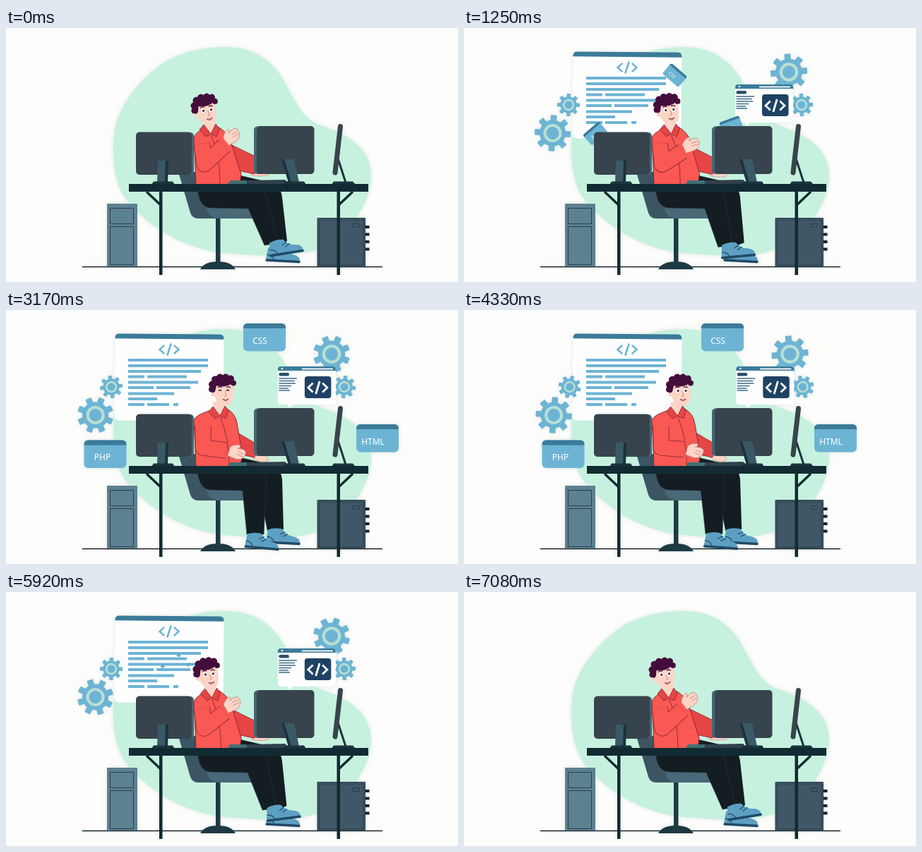
Animation of 640x360 px, one loop 7.16 s. Source, as an HTML page:

```html
<!DOCTYPE html>
<html lang="en">
<head>
<meta charset="utf-8">
<title>Developer at a desk</title>
<style>
  html, body { margin: 0; width: 100%; height: 100%; overflow: hidden; background: #fdfdfc; }
  svg { display: block; width: 100vw; height: 100vh; }
  #scene { filter: drop-shadow(0 0 3px rgba(185, 200, 195, .4)); }
  text { font-family: "Noto Sans", "Open Sans", sans-serif; fill: #fff; text-anchor: middle; }
  .code { fill: none; stroke-linejoin: miter; }
</style>
</head>
<body>
<svg viewBox="0 0 640 360">
  <g id="scene">
    <path fill="#c6f1de" d="M310 27C350 27 376 45 392 72C408 100 416 124 440 136C472 147 517 163 517 210C517 245 488 294 440 314C405 327 350 323 300 318C240 308 195 275 168 240C152 215 150 180 153 150C158 110 190 70 230 45C255 32 285 27 310 27Z"/>
    <g id="back"></g>
    <g id="tags"></g>
    <path stroke="#17242a" stroke-width="1.5" d="M108 338.5H533"/>

    <g stroke="#2a3e4e">
      <path fill="#5c8190" stroke="none" d="M143 249H186V338H143Z"/>
      <path fill="none" d="M147.5 255.5H180.5V277.5H147.500ZM147.5 281.5H180.5V335.5H147.500Z"/>
      <path fill="#3f5766" d="M441 269.5H508.5V338H441Z"/>
      <path fill="none" d="M443.5 272H506V336H443.500ZM491.5 277.5H500.5V282.5H491.500Z"/>
      <path stroke="#13232a" stroke-width="4" d="M509 282H514.5M509 292.500H514.5M509 303H514.5M509 313.500H514.5"/>
    </g>

    <g id="chair">
      <path fill="#3b5563" d="M244 204H270L282 252L350 253Q354 262 350 270H272Q264 270 261 262Z"/>
      <path fill="#496878" d="M284 255H350Q355 262 350 270H300Q286 268 284 255Z"/>
      <path fill="#1d3943" d="M297 270H303.5V332H297ZM275 342Q281 331 300 331Q319 331 325 342Z"/>
    </g>

    <g id="man"></g>

    <g id="desk">
      <path fill="#3f6f74" d="M317 216H341L343 221.5H314Z"/>
      <path fill="#30404b" d="M342 216L395 215L402 221.5H340Z"/>
      <rect x="187" y="148" width="79" height="60" rx="5" fill="#456672"/>
      <rect x="184" y="147.5" width="79" height="60.5" rx="5" fill="#37444d"/>
      <path fill="#3a5965" d="M215 188H229V219H214Z"/>
      <path fill="#1a333d" d="M226 188H230L229 219H225ZM209 217.5H236L239 222H206Z"/>
      <rect x="351" y="139.5" width="80" height="67.5" rx="5" fill="#456672"/>
      <rect x="355" y="139" width="81.5" height="68" rx="5" fill="#37444d"/>
      <path fill="#3a5965" d="M390 186H408L415 219H400Z"/>
      <path fill="#1a333d" d="M390 186H394L404 219H400ZM395 217.5H422L425 222H392Z"/>
      <path stroke="#1a333d" stroke-width="3" d="M470 185L481 219"/>
      <path stroke="#37444d" stroke-width="7" stroke-linecap="round" d="M473.5 139.5L466 205"/>
      <path fill="#1a333d" d="M464 217.5H491L495 222H461Z"/>
      <path fill="#122b32" d="M174 221H513V232H174ZM217 232H221.5V350H217ZM468.5 232H473V350H468.500Z"/>
      <path stroke="#122b32" stroke-width="3.5" fill="none" d="M199 232L219 251M491 232L471 251"/>
    </g>
  </g>
</svg>
<script>
const $ = id => document.getElementById(id);
const LOOP = 7160;
const BLUE = '#6db4d4', DEEP = '#3b7b99', NAVY = '#1f4264';
const RED = '#f95853', DARK_RED = '#e64545', LINE = '#7d2230', SKIN = '#fdd5c6', PANTS = '#141d22', HAIR = '#430e3c';

const mix = (a, b, p) => a + (b - a) * p;
const ease = (k, start, span) => {
  const p = Math.min(1, Math.max(0, (k - start) / span));
  return (1 - Math.cos(Math.PI * p)) / 2;
};
const place = (x, y, s, r = 0) => `translate(${x} ${y}) rotate(${r}) scale(${s})`;
const bar = (x1, x2, y, h, fill) => `<rect x="${x1}" y="${y - h / 2}" width="${x2 - x1}" height="${h}" fill="${fill}"/>`;

// </> drawn around the origin
const codeMark = (w, h, color, width) => `<path class="code" stroke="${color}" stroke-width="${width}"
  d="M${-w * .25} ${-h * .36}L${-w / 2} 0L${-w * .25} ${h * .36}M${w * .25} ${-h * .36}L${w / 2} 0L${w * .25} ${h * .36}M${w * .1} ${-h / 2}L${-w * .1} ${h / 2}"/>`;

const gear = r => {
  const teeth = [0, 45, 90, 135].map(a =>
    `<rect x="${-r * .17}" y="${-r}" width="${r * .34}" height="${r * 2}" rx="1" transform="rotate(${a})"/>`).join('');
  return `<g fill="${BLUE}"><circle r="${r * .73}"/>${teeth}</g>
    <circle r="${r * .43}" fill="none" stroke="#b9dfd3" stroke-width="${r * .16}"/>`;
};

const textRows = [
  [71, 173, 286], [79, 173, 286], [87, 173, 276], [94.5, 173, 196], [94.5, 200, 256],
  [102.5, 173, 272], [110, 173, 209], [110, 213, 261], [118.5, 173, 238],
  [126, 173, 214], [134, 173, 196], [134, 200, 231], [134, 237, 244]
];
const bigWindow = `<g transform="translate(-231 -95.5)">
  <g transform="rotate(.5 231 95.5)">
    <rect x="154" y="34" width="154" height="123" rx="6" fill="#fefefe"/>
    <path fill="${DEEP}" d="M154 41V40Q154 34 160 34H302Q308 34 308 40V41Z"/></g>
  <g transform="translate(231 56)">${codeMark(27, 17, BLUE, 2.6)}</g>
  ${textRows.map(([y, a, b]) => bar(a, b, y, 4, BLUE)).join('')}</g>`;

const smallRows = [[97, 411], [100.5, 408], [104, 409], [107.5, 403], [111, 399], [114, 401]];
const smallWindow = `<g transform="translate(-425 -108)">
  <path fill="#fefefe" d="M388 80H462Q466 80 466 84V130Q466 134 462 134H406L400 139L398 134H388Q384 134 384 130V84Q384 80 388 80Z"/>
  <path fill="${DEEP}" d="M384 86V84Q384 80 388 80H462Q466 80 466 84V86Z"/>
  <circle cx="390" cy="83" r="1.3" fill="#fff"/>${bar(418, 462, 83.5, 1.8, '#fff')}
  <rect x="385.5" y="89" width="14.5" height="4.5" rx="2" fill="#28506a"/>
  ${smallRows.map(([y, b]) => bar(385.5, b, y, 1.5, '#3a6a85')).join('')}
  <rect x="422" y="94" width="37.5" height="31" rx="4" fill="${NAVY}"/>
  <g transform="translate(440.5 110)">${codeMark(27, 18, '#fff', 2.8)}</g></g>`;

const props = [
  { x: 460, y: 62.5, spin: 1.2, art: gear(26) },
  { x: 478, y: 109, spin: -1.6, art: gear(16) },
  { x: 231, y: 95.5, spin: 0, art: bigWindow },
  { x: 425, y: 108, spin: 0, art: smallWindow, drift: .8 },
  { x: 125.5, y: 149, spin: -1.2, art: gear(25.5) },
  { x: 148, y: 109, spin: 1.6, art: gear(16) }
];
const tags = [
  { label: 'CSS', x: 366, y: 38.5, tilt: 42, tx: -6.5, ty: 9.5 },
  { label: 'PHP', x: 140.5, y: 204, tilt: -42, tx: -4, ty: 9 },
  { label: 'HTML', x: 526, y: 181.5, tilt: -21, tx: -6.5, ty: 9.5 }
];

function add(parent, art) {
  const g = document.createElementNS('http://www.w3.org/2000/svg', 'g');
  g.innerHTML = art;
  return parent.appendChild(g);
}
for (const p of props) p.el = add($('back'), p.art);
for (const t of tags) t.el = add($('tags'), `
  <rect x="-30" y="-19.5" width="60" height="39.5" rx="6" fill="${BLUE}"/>
  <path fill="${DEEP}" d="M-30 -12.5V-13.5Q-30 -19.5 -24 -19.5H24Q30 -19.5 30 -13.5V-12.500Z"/>
  <text x="${t.tx}" y="${t.ty}" font-size="12">${t.label}</text>`);

// 0: leaning back, hand raised; 1: upright, hand on the desk
const poseKeys = [[0, 0], [7, .04], [15, .25], [25, .71], [32, .94], [38, 1], [46, 1], [52, .96], [62, .52], [71, .115], [78, 0], [86, 0]];
function pose(k) {
  const i = poseKeys.findIndex((key, n) => n && k <= key[0]);
  const [a, b] = [poseKeys[i - 1], poseKeys[i]];
  return mix(a[1], b[1], (k - a[0]) / (b[0] - a[0]));
}

const shoe = (x, y, r) => `<g transform="${place(x, y, 1, r)}">
  <path fill="#5d9fc2" d="M1 -3L3 -20Q12 -24 23 -22Q29 -13 39 -12Q49 -10 49 -3Z"/>
  <path fill="none" stroke="#204a66" stroke-width="1.2" d="M20 -14L27 -18M24 -11L31 -15M2 -10Q9 -10 12 -4"/>
  <path stroke="#204a66" stroke-width="3.5" stroke-linecap="round" d="M2 -2H48"/></g>`;

const curls = [[-16, 2, 4], [-15, -5, 5], [-11, -12, 5], [-4, -15, 5], [4, -15, 5], [11, -13, 5], [15, -7, 4]];
function head(x, y, r, blink) {
  const eyes = blink
    ? '<path d="M-6 4Q-4 2 -2 4M5 4Q7 2 9 4" fill="none" stroke="#2b1428" stroke-width="1.2"/>'
    : `<g fill="#fff"><ellipse cx="-3.5" cy="4" rx="2.6" ry="3"/><ellipse cx="7.5" cy="4" rx="2.6" ry="3"/></g>
       <g fill="#2b1428"><circle cx="-3" cy="4" r="1.5"/><circle cx="8" cy="4" r="1.5"/></g>`;
  return `<g transform="${place(x, y, 1, r)}">
    <circle cx="-13" cy="8" r="4" fill="${SKIN}"/>
    <path fill="${SKIN}" d="M-13 -9L-12 11Q-8 25 4 26Q14 25 15 8L14 -9Z"/>
    <g fill="${HAIR}"><ellipse cx="-1" cy="-9" rx="14" ry="7"/><path d="M-18 -8H-8L-11 5L-14 7L-18 4Z"/>
    ${curls.map(([cx, cy, cr]) => `<circle cx="${cx}" cy="${cy}" r="${cr}"/>`).join('')}</g>
    ${eyes}
    <path fill="none" stroke="${HAIR}" stroke-width="1.3" d="M-7 -.5Q-4 -2.5 -1 -1M5 -1Q8 -2.5 11 -.5"/>
    <path fill="none" stroke="#cf8a80" d="M3 5L5 11L2 12"/>
    <path fill="#fff" stroke="#8c3044" stroke-width=".9" d="M0 16Q4 18 8 15.5Q5 20.500 0 16Z"/></g>`;
}

function man(k) {
  const p = pose(k), m = (a, b) => mix(a, b, p).toFixed(2);
  const hx = m(319, 326), hy = m(154, 202);
  const neck = mix(289, 302, p);
  const arm = `M${m(277, 279)} 164L${m(281, 279)} ${m(193, 195)}L${m(309, 312)} ${m(167, 199)}`;
  const sleeve = (color, width) => `<path fill="none" stroke="${color}" stroke-width="${width}" stroke-linejoin="round" d="${arm}"/>`;
  return `
    <path fill="${PANTS}" d="M328 222L332 209L366 217V222Z"/>
    <path fill="${PANTS}" d="M350 226H384Q390 230 391 240L${m(398, 393)} ${m(302, 311)}L${m(376, 370)} 313L358 250Z"/>
    ${shoe(367, 331, 3)}
    <path fill="${PANTS}" stroke="#2c3a42" stroke-width=".6" d="M271 224Q272 254 290 255L${m(343, 335)} 256L${m(366, 341)} ${m(308, 318)}L${m(385, 365)} ${m(305, 318)}L369 238L360 222Z"/>
    ${shoe(m(373, 337), m(325, 337), m(-9, 5))}
    <path fill="${SKIN}" stroke="#cf8a80" stroke-width=".7" d="M348 ${m(200, 203)}L362 ${m(202, 204)}Q374 ${m(206, 209)} 371 ${m(209, 214)}Q358 ${m(211, 217)} 348 209Z"/>
    <path fill="${DARK_RED}" stroke="${LINE}" stroke-width=".8" d="M${m(320, 328)} ${m(166, 174)}L355 ${m(183, 190)}L352 ${m(207, 209)}L328 ${m(202, 204)}Z"/>
    <path fill="${RED}" stroke="${LINE}" stroke-width=".9" d="M266 156Q268 149 ${m(277, 290)} ${m(144, 142)}L${m(300, 313)} 140Q${m(313, 325)} 147 ${m(318, 327)} 160L${m(333, 335)} 207L331 222H269Z"/>
    <path fill="${SKIN}" d="M${neck - 9} 130H${neck + 7}V142L${neck + 1} 152L${neck - 9} 143Z"/>
    ${head(m(282, 307), m(113, 110.5), m(-8, 0), k > 36 && k < 40)}
    <path fill="${DARK_RED}" stroke="${LINE}" stroke-width=".8" d="M${neck - 9} 137L${neck + 1} 150L${neck - 6} 154L${neck - 15} 144ZM${neck + 8} 136L${neck + 1} 150L${neck + 9} 154L${neck + 13} 143Z"/>
    <path fill="none" stroke="${LINE}" stroke-width=".8" d="M${neck + 1} 151Q${neck + 14} 180 ${neck + 14} 221"/>
    ${sleeve(LINE, 23)}${sleeve(RED, 21.5)}
    <g transform="${place(hx, hy, 1, m(-42, 12))}">
      <path fill="${SKIN}" stroke="#c07a74" stroke-width=".7" d="M-10 -6Q-4 -12 4 -11Q5 -8 1 -6Q8 -8 13 -4Q14 0 12 4Q8 10 0 9L-11 7Z"/>
      <path fill="none" stroke="#c07a74" stroke-width=".7" d="M2 -2L11 0M1 2L10 4"/></g>`;
}

function draw(k) {
  const grow = ease(k, 1, 9.5) - ease(k, 77, 8);
  const sway = 1.6 * ease(k, 15, 37) - .8 * ease(k, 58, 20);
  for (const { el, x, y, spin, drift = spin ? 1 : 0 } of props) {
    const turn = spin ? 22 + spin * k : 0;
    el.setAttribute('transform', place(x + sway * drift, y, grow, turn));
  }
  // labels fly out of the big window's centre
  const reach = ease(k, 10.5, 9) - ease(k, 61, 12.5);
  const lean = 1 - ease(k, 14, 9) + ease(k, 57, 10);
  for (const { el, x, y, tilt } of tags) {
    el.setAttribute('transform', place(mix(231, x, reach), mix(95, y, reach), reach, tilt * lean));
  }
  $('man').innerHTML = man(k);
}

let last = -1;
const start = performance.now();
function tick(now) {
  const t = Math.max(0, now - start) % LOOP;
  const k = Math.floor((Math.floor(t / 10) + .5) * .12); // 12 steps a second
  if (k !== last) draw(last = k);
  requestAnimationFrame(tick);
}
tick(start);
</script>
</body>
</html>
```
